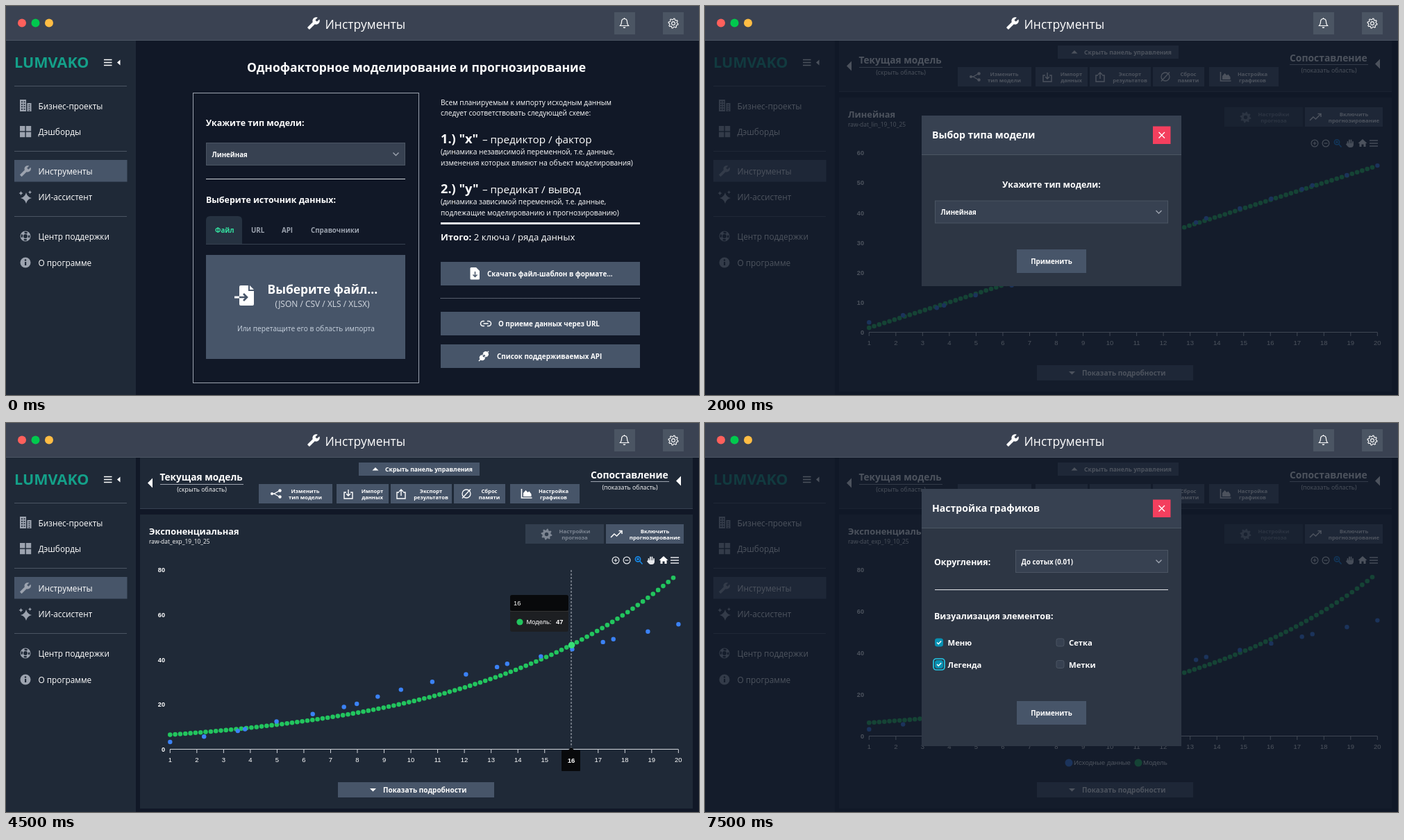
Write an HTML page that moves like this. It is 998 px wide and 561 px high and loops after 8 s.

```html
<!DOCTYPE html>
<html lang="ru">
<head>
<meta charset="utf-8">
<style>
  html, body { margin: 0; width: 100%; height: 100%; overflow: hidden; background: #111827; }
  svg { display: block; width: 998px; height: 561px; font-family: "Open Sans", "Noto Sans", sans-serif; }
  .chart { font-family: "Liberation Sans", Arial, sans-serif; }
</style>
</head>
<body>
<svg id="stage" viewBox="0 0 998 561"></svg>
<script>
const BG = '#111827', PANEL = '#1f2937', BAR = '#374151', EDGE = '#4b5563', BTN = '#475569', HOT = '#5b6a80';
const MUTED = '#9ca3af', GREEN = '#22c55e', BLUE = '#3b82f6', CYAN = '#06b6d4';
const BOLD = 'font-weight="700" ', MID = 'text-anchor="middle" ', END = 'text-anchor="end" ';

// Drawing helpers
const rect = (x, y, w, h, fill, more = '') => `<rect x="${x}" y="${y}" width="${w}" height="${h}" fill="${fill}" ${more}/>`;
const frame = (x, y, w, h, fill, stroke, sw = 1) =>
  rect(x + sw / 2, y + sw / 2, w - sw, h - sw, fill, `stroke="${stroke}" stroke-width="${sw}"`);
const dot = (x, y, r, fill, more = '') => `<circle cx="${x}" cy="${y}" r="${r}" fill="${fill}" ${more}/>`;
const text = (x, y, size, str, more = '', fill = '#fff') =>
  `<text x="${x}" y="${y}" font-size="${size}" fill="${fill}" ${more}>${str}</text>`;
const fillPath = (d, fill = '#fff', more = '') => `<path d="${d}" fill="${fill}" ${more}/>`;
const line = (d, color = '#fff', w = 1, more = '') => `<path d="${d}" fill="none" stroke="${color}" stroke-width="${w}" ${more}/>`;
const hline = (x1, x2, y, color, w = 1, more) => line(`M${x1} ${y}H${x2}`, color, w, more);
const at = (x, y, body, scale = 1) => `<g transform="translate(${x} ${y}) scale(${scale})">${body}</g>`;

// Icons, centred on 0,0
const wrench = color => fillPath('M22.7 19l-9.1-9.1c.9-2.3.4-5-1.5-6.9-2-2-5-2.4-7.4-1.3L9 6 6 9 1.6 4.7C.4 7.1.9 10.1 2.9 12.1c1.9 1.9 4.6 2.4 6.9 1.5l9.1 9.1c.4.4 1 .4 1.4 0l2.3-2.3c.5-.4.5-1.1.1-1.4z',
  color, 'transform="scale(-1 1) translate(-12 -12)"');
function gear(r, hole) {
  const pts = [];
  for (let i = 0; i < 32; i++) {
    const a = (i + .5) * Math.PI / 16, k = i % 4 < 2 ? r : r * .76;
    pts.push((k * Math.cos(a)).toFixed(2) + ' ' + (k * Math.sin(a)).toFixed(2));
  }
  return `M${pts.join('L')}ZM${hole} 0A${hole} ${hole} 0 1 0 ${-hole} 0A${hole} ${hole} 0 1 0 ${hole} 0Z`;
}
const star = (x, y, r) => fillPath(`M${x} ${y - r}Q${x + r * .2} ${y - r * .2} ${x + r} ${y}Q${x + r * .2} ${y + r * .2} ${x} ${y + r}Q${x - r * .2} ${y + r * .2} ${x - r} ${y}Q${x - r * .2} ${y - r * .2} ${x} ${y - r}Z`, MUTED);
const chevron = (x, y) => line(`M${x - 4} ${y - 2}l4 4 4-4`, MUTED, 1.4);
const tray = up => line('M-3-3H-6V6H6V-3H3', '#fff', 1.4) +
  line(up ? 'M0 2V-7M-3-4L0-7L3-4' : 'M0-7V2M-3-1L0 2L3-1', '#fff', 1.4);

function header() {
  return rect(0, 0, 998, 50, '#3a4252') + hline(0, 998, 49.5, EDGE) +
    ['#ff605c', '#00ca4e', '#ffbd44'].map((c, i) => dot(23 + i * 19.5, 24.5, 6, c)).join('') +
    at(443, 25, wrench('#fff'), .8) + text(459.5, 33, 17.5, 'Инструменты') +
    rect(876, 9, 30, 32, EDGE) + rect(946, 9, 30, 32, EDGE) +
    line('M884.5 28.5h12q-2-2-2-5.5c0-6-8-6-8 0q0 3.5-2 5.5zM889 30.5q1.5 1.5 3 0M890.5 18v-1', '#fff', 1.2) +
    at(961, 25, line(gear(7, 2.4), '#fff', 1.1));
}

function sidebar() {
  const items = [[144, 'Бизнес-проекты'], [181, 'Дэшборды'], [238, 'Инструменты'], [275, 'ИИ-ассистент'], [332, 'Центр поддержки'], [370, 'О программе']];
  let s = rect(0, 50, 187, 511, PANEL) +
    text(12, 89, 21.5, 'LUMVAKO', BOLD, '#14a089') +
    [77.5, 81.5, 85.5].map(y => hline(141, 152.5, y, '#fff', 1.5)).join('') + fillPath('M164.5 77.5v8l-4.5-4z') +
    [115.5, 209.5, 303.5].map(y => hline(12, 174, y, EDGE)).join('') + rect(12, 222, 162.5, 31.5, BTN);
  s += items.map(([y, t]) => text(46.5, y + 4.5, 11.8, t)).join('');
  s += rect(20, 135, 9, 17, MUTED) + rect(30.5, 140, 6, 12, MUTED);
  for (let i = 0; i < 4; i++)
    s += rect(22, 137.5 + i * 3.5, 2, 1.6, PANEL) + rect(25.5, 137.5 + i * 3.5, 2, 1.6, PANEL) + rect(32.5, 142 + i * 2.7, 2, 1.3, PANEL);
  for (let i = 0; i < 4; i++) s += rect(20 + i % 2 * 8.8, 173 + (i >> 1) * 8.8, 7.4, 7.4, MUTED);
  s += at(28, 238, wrench(MUTED), .72) + star(29, 277, 8) + star(21.5, 270, 3) + star(34.5, 268.5, 2.5);
  s += dot(28, 332, 5.2, 'none', `stroke="${MUTED}" stroke-width="4.6"`) +
    dot(28, 332, 5.2, 'none', `stroke="${PANEL}" stroke-width="2.4" stroke-dasharray="4.08" stroke-dashoffset="2.04"`);
  return s + dot(28, 370, 7.5, MUTED) + rect(27, 369, 2.2, 5, PANEL) + dot(28, 366.5, 1.3, PANEL);
}

function select(x, y, w, value, focused) {
  return (focused ? frame(x - 1, y - 1, w + 2, 34, BAR, CYAN, 2) : frame(x, y, w, 33, BAR, EDGE)) +
    text(x + 8.5, y + 20.5, 9.7, value, BOLD) + chevron(x + w - 13.5, y + 16.5);
}

function importPage(s) {
  const hint = (y, t) => text(626, y, 10.2, t);
  const heading = (y, n, t) => text(626, y, 18.2, n, BOLD) + text(686, y, 15.3, t, 'font-weight="500"');
  const action = (y, x, t) => rect(626, y, 287, 34, BTN) + text(x, y + 21, 9.8, t, BOLD);
  return text(591, 95, 17.5, 'Однофакторное моделирование и прогнозирование', BOLD + MID) +
    frame(269, 125, 326, 419, 'none', MUTED) +
    text(288, 173, 12.4, 'Укажите тип модели:', BOLD) + select(288, 197, 287, 'Линейная') +
    hline(288, 575, 249.5, '#d1d5db') + text(288, 284, 12.4, 'Выберите источник данных:', BOLD) +
    fillPath('M288 343V309q0-6 6-6h40q6 0 6 6v34z', '#263241') + hline(288, 575, 343.5, BAR) +
    [[301, 'Файл', '#34e0a0'], [353, 'URL', MUTED], [397, 'API', MUTED], [439, 'Справочники', MUTED]]
      .map(([x, t, c]) => text(x, 327, 9.75, t, BOLD, c)).join('') +
    rect(288, 359, 287, 150, s.hot === 'drop' ? HOT : BTN) +
    fillPath('M338 403h11v8h8v19q0 2-2 2h-17q-2 0-2-2v-25q0-2 2-2zM351 403l6 6h-6z') +
    hline(329, 336, 420, '#fff', 3) + line('M336 420h10M342 415l5 5-5 5', BTN, 2.6) +
    text(376.5, 415, 17.4, 'Выберите файл...', BOLD) +
    text(455.5, 434, 12, '(JSON / CSV / XLS / XLSX)', MID, '#d5dae2') +
    text(432, 469, 10.2, 'Или перетащите его в область импорта', MID, '#cbd5e1') +
    hint(143, 'Всем планируемым к импорту исходным данным') + hint(158, 'следует соответствовать следующей схеме:') +
    heading(198, '1.) "x"', '– предиктор / фактор') +
    hint(214, '(динамика независимой переменной, т.е. данные,') + hint(230, 'изменения которых влияют на объект моделирования)') +
    heading(270, '2.) "y"', '– предикат / вывод') +
    hint(286, '(динамика зависимой переменной, т.е. данные,') + hint(302, 'подлежащие моделированию и прогнозированию)') +
    hline(626, 913, 313.5, '#e5e7eb', 3) +
    text(626, 337.5, 13.2, `<tspan ${BOLD}>Итого:</tspan> 2 ключа / ряда данных`) +
    action(369, 693, 'Скачать файл-шаблон в формате...') + hline(626, 913, 421.5, MUTED, 1, 'stroke-dasharray="1 1"') +
    action(441, 709, 'О приеме данных через URL') + action(488, 707, 'Список поддерживаемых API') +
    fillPath('M670 377h7l5 5v11q0 1.5-1.5 1.5h-10.5q-1.5 0-1.5-1.5v-14.5q0-1.5 1.5-1.5z') +
    line('M675.5 383v7M672.5 387.5l3 3 3-3', BTN, 1.5) +
    line('M689 454.5h-2a3.5 3.5 0 0 0 0 7h2M693 454.5h2a3.5 3.5 0 0 1 0 7h-2M687.5 458h7', '#fff', 1.5) +
    at(688, 505, `<g transform="rotate(45)">${fillPath('M-4-2h8v-2a4 4 0 0 0-8 0zM-4 1h8v2a4 4 0 0 1-8 0z') + line('M0-8v-2M0 6v4M-2-2v3M2-2v3', '#fff', 1.5)}</g>`);
}

// Source points: x, y
const points = [[1, 3.4], [2.27, 5.8], [3.53, 8.3], [3.8, 9.1], [4.98, 12.5], [6.33, 15.8], [7.5, 19], [7.98, 20.4], [8.76, 23.6],
  [9.63, 26.7], [10.8, 30.2], [12.06, 33.5], [13.22, 36.8], [13.6, 38.2], [14.86, 41.5], [16.03, 44.7], [17.18, 47.9], [17.57, 49.2], [18.86, 52.6], [20, 55.8]];
const models = { lin: x => 1.6 + 2.85 * (x - 1), exp: x => 6.6 * Math.exp(.1303 * (x - 1)) };

function chart(s) {
  const lin = s.model === 'lin', top = lin ? 60 : 80, step = lin ? 10 : 20, base = s.legend ? 452 : 471;
  const px = x => 236.3 + (x - 1) * 38.53, py = y => base - y * (base - 212) / top;
  let g = '';
  for (let v = 0; v <= top; v += step) g += text(229, py(v) + 3.2, 9.2, v, BOLD + END);
  g += hline(236, 968.5, base - .5, '#d1d5db');
  for (let v = 1; v <= 20; v++)
    g += line(`M${px(v)} ${base}v5`, '#d1d5db') + text(px(v), base + 18, 9.5, v, MID);
  if (s.tip) g += line(`M814 212V${base}`, '#b6bcc6', 1, 'stroke-dasharray="3 2"');
  for (let i = 0; i < 100; i++) {
    const x = 1 + i * .19;
    g += dot(px(x).toFixed(1), py(models[s.model](x)).toFixed(1), 3.3, GREEN);
  }
  g += points.map(([x, y]) => dot(px(x).toFixed(1), py(y).toFixed(1), 3.2, BLUE)).join('');
  if (s.legend)
    g += dot(524, 490, 5.5, BLUE) + text(531, 493, 9.7, 'Исходные данные') + dot(624, 490, 5.5, GREEN) + text(631, 493, 9.7, 'Модель');
  if (s.tip)
    g += dot(814.6, 320.3, 4.8, '#38e078') +
      rect(726, 248, 84, 53, '#1d1f22', 'rx="3"') + rect(726, 248, 84, 23, '#08090b', 'rx="3"') + hline(726, 810, 271.5, '#333') +
      text(731, 262.5, 9.3, '16') + dot(740, 287, 4.6, GREEN) + text(749.5, 290, 9.3, 'Модель:') + text(792, 290, 9.3, '47', BOLD) +
      rect(800, 472, 27, 30, '#08090b', 'rx="1"') + fillPath('M809 472.5l5-5 5 5z', '#08090b') + text(814, 489.5, 9.5, '16', MID + BOLD);
  return `<g class="chart">${g}</g>`;
}

function chartTools() {
  const lens = (x, sign) => dot(x, 198, 4.9, 'none', 'stroke="#e5e7eb" stroke-width="1.2"') + line(`M${x - 2.5} 198h5` + sign, '#e5e7eb', 1.2);
  return lens(878, 'M878 195.5v5') + lens(894, '') +
    dot(910, 196.3, 3.6, 'none', 'stroke="#168df0" stroke-width="1.6"') + line('M912.5 199l4 4.5M908.3 196.3h3.4M910 194.6v3.4', '#168df0', 1.5) +
    line('M925.5 200v-4M928 199v-5.5M930.5 199v-5.5M933 200v-4', '#e5e7eb', 1.8, 'stroke-linecap="round"') +
    fillPath('M924.6 198h9.3v2q0 4-4 4h-1.5q-2.5 0-5.4-4.8z', '#e5e7eb') +
    fillPath('M947 192l6.5 6h-2v5h-3v-3.5h-3v3.5h-3v-5h-2z') +
    [194, 198, 202].map(y => hline(957, 969, y, '#e5e7eb', 1.5)).join('');
}

function chartPage(s) {
  const pair = (x, y, size, a, b, fill) => text(x, y, size, a, BOLD + MID, fill) + text(x, y + 8.8, size, b, BOLD + MID, fill);
  const tool = (id, x, w, cx, a, b) => rect(x, 88, w, 28, s.hot === id ? HOT : BTN) + pair(cx, 100.7, 7.65, a, b);
  const lin = s.model === 'lin';
  return rect(193, 50, 796, 74, PANEL) + hline(193, 989, 123.5, BAR) + rect(193, 132, 796, 424, PANEL) +
    fillPath('M211 79.5v14l-7-7zM972 76.5v14l-7-7z') +
    text(221.5, 82.5, 13.7, 'Текущая модель', BOLD) + hline(222, 342, 88.5, MUTED) + text(282, 99, 8.8, '(скрыть область)', MID) +
    text(842, 79.5, 13.9, 'Сопоставление', BOLD) + hline(842, 955, 84.5, MUTED) + text(898.5, 95.5, 8.8, '(показать область)', MID) +
    rect(508, 57, 174, 19, BTN) + fillPath('M527.5 68.5l4.5-4.5 4.5 4.5z') + text(546, 70, 8.7, 'Скрыть панель управления', BOLD) +
    tool('type', 364, 106, 431, 'Изменить', 'тип модели') + tool('in', 476, 75, 527.5, 'Импорт', 'данных') +
    tool('out', 554, 88, 612, 'Экспорт', 'результатов') + tool('reset', 645, 74, 696, 'Сброс', 'памяти') +
    tool('view', 726, 100, 788.5, 'Настройка', 'графиков') +
    line('M382 102h4l8-4.5M386 102l8 4.5', '#fff', 1.3) + dot(383, 102, 2, '#fff') + dot(394.5, 97.5, 2.2, '#fff') + dot(394.5, 106.5, 2.2, '#fff') +
    at(493, 103, tray(false)) + at(569, 103, tray(true)) +
    dot(663, 102, 6, 'none', 'stroke="#fff" stroke-width="1.3"') + line('M657 108.5l12-13', '#fff', 1.3) +
    line('M742.5 95v13h15', '#fff', 1.6) + fillPath('M745 106v-5l3.5-4 3 3 2-1.5 3 4v3.5z') +
    text(206, 161, 12.85, lin ? 'Линейная' : 'Экспоненциальная', BOLD) +
    text(206, 174, 8.4, `raw-dat_${s.model}_19_10_25`) +
    rect(748, 146, 113, 28, '#323e4e') + at(778.5, 160.5, fillPath(gear(8, 2.7), '#7d8693', 'fill-rule="evenodd"')) +
    pair(819, 159, 7.8, 'Настройки', 'прогноза', '#7d8693') +
    rect(864, 146, 112, 28, BTN) + line('M871 165l5-5 3.5 3 7-7M882.5 155.5h4.5v4.5', '#fff', 1.5) +
    pair(934.5, 159, 7.8, 'Включить', 'прогнозирование') +
    chartTools() + chart(s) +
    rect(478, 518, 225, 22, BTN) + fillPath('M524 527h9l-4.5 4.5z') + text(543, 533, 10, 'Показать подробности', BOLD);
}

function dropdown(x, y, w, items, active) {
  return rect(x, y, w, items.length * 21 + 2, BAR) +
    items.map((t, i) => (i === active ? rect(x, y + 1 + i * 21, w, 21, '#787674') : '') + text(x + 8, y + 15.5 + i * 21, 9.7, t, BOLD)).join('') +
    frame(x, y, w, items.length * 21 + 2, 'none', '#6b7280');
}

function dialog(y, h, buttonY, title, hot, body) {
  return rect(0, 50, 998, 511, BG, 'opacity=".75"') +
    rect(312, y, 374, h, '#2d3644') + rect(312, y, 374, 56, BAR) + hline(312, 686, y + 56.5, EDGE) +
    text(327, y + 33, 14.1, title, BOLD) +
    rect(645, y + 15.5, 25.5, 25.5, '#f43f5e') + line(`M653.5 ${y + 24}l8.5 8.5m0-8.5l-8.5 8.5`, '#fff', 1.4) +
    rect(449, buttonY, 100, 34, hot ? HOT : BTN) + text(499, buttonY + 20.5, 9.8, 'Применить', BOLD + MID) + body;
}

const types = ['Линейная', 'Экспоненциальная'];
const rounding = ['До единиц (1)', 'До десятых (0.1)', 'До сотых (0.01)', 'До тысячных (0.001)'];

function typeDialog(s) {
  const open = s.item !== undefined;
  return dialog(158, 246, 351, 'Выбор типа модели', s.hot === 'apply',
    text(499, 262, 12.4, 'Укажите тип модели:', BOLD + MID) +
    select(331, 280.5, 336, types[s.model === 'lin' ? 0 : 1], open || s.focus) +
    (open ? dropdown(331, 316, 336, types, s.item) : ''));
}

function check(x, y, label, on, ring) {
  return (ring ? rect(x - 8, y - 8, 16, 16, 'none', 'rx="4" stroke="#22c8e6" stroke-width="1.7"') : '') +
    rect(x - 5.5, y - 5.5, 11, 11, on ? '#0891b2' : BAR, `rx="2.5" stroke="${on ? '#0891b2' : EDGE}"`) +
    (on ? line(`M${x - 3} ${y}l2.2 2.2 4-4.2`, '#fff', 1.5) : '') +
    text(x + 12.5, y + 4.5, 11.3, label, BOLD);
}

function viewDialog(s) {
  const open = s.item !== undefined;
  return dialog(95, 371, 401, 'Настройка графиков', false,
    text(330, 204.5, 12.4, 'Округления:', BOLD) + select(447, 183, 220, rounding[s.round], open || s.focus) +
    hline(331, 667, 240.5, '#e5e7eb') + text(330, 283, 12.4, 'Визуализация элементов:', BOLD) +
    check(337, 316.5, 'Меню', true) + check(511.5, 316.5, 'Сетка') +
    check(337, 348, 'Легенда', s.legend, s.legend) + check(511.5, 348, 'Метки') +
    (open ? dropdown(447, 218, 220, rounding, s.item) : ''));
}

// One state per half second
const lin = { model: 'lin' }, exp = { model: 'exp' };
const typeLin = { ...lin, dialog: typeDialog }, typeExp = { ...exp, dialog: typeDialog };
const view = { ...exp, dialog: viewDialog, round: 0 };
const steps = [
  {}, { hot: 'drop' },
  lin, { ...lin, hot: 'type' },
  typeLin, { ...typeLin, item: 0 }, { ...typeLin, item: 1 },
  { ...typeExp, focus: true }, { ...typeExp, hot: 'apply' },
  { ...exp, tip: true }, { ...exp, hot: 'view' },
  view, { ...view, item: 0 }, { ...view, item: 2 },
  { ...view, round: 2, focus: true }, { ...view, round: 2, legend: true }
];

const stage = document.getElementById('stage');
const start = performance.now();
let shown = -1;
function tick() {
  const i = Math.floor((performance.now() - start) % 8000 / 500);
  if (i !== shown) {
    const s = steps[shown = i];
    stage.innerHTML = rect(0, 0, 998, 561, BG) + sidebar() + (s.model ? chartPage(s) : importPage(s)) +
      (s.dialog ? s.dialog(s) : '') + header();
  }
  requestAnimationFrame(tick);
}
tick();
</script>
</body>
</html>
```
